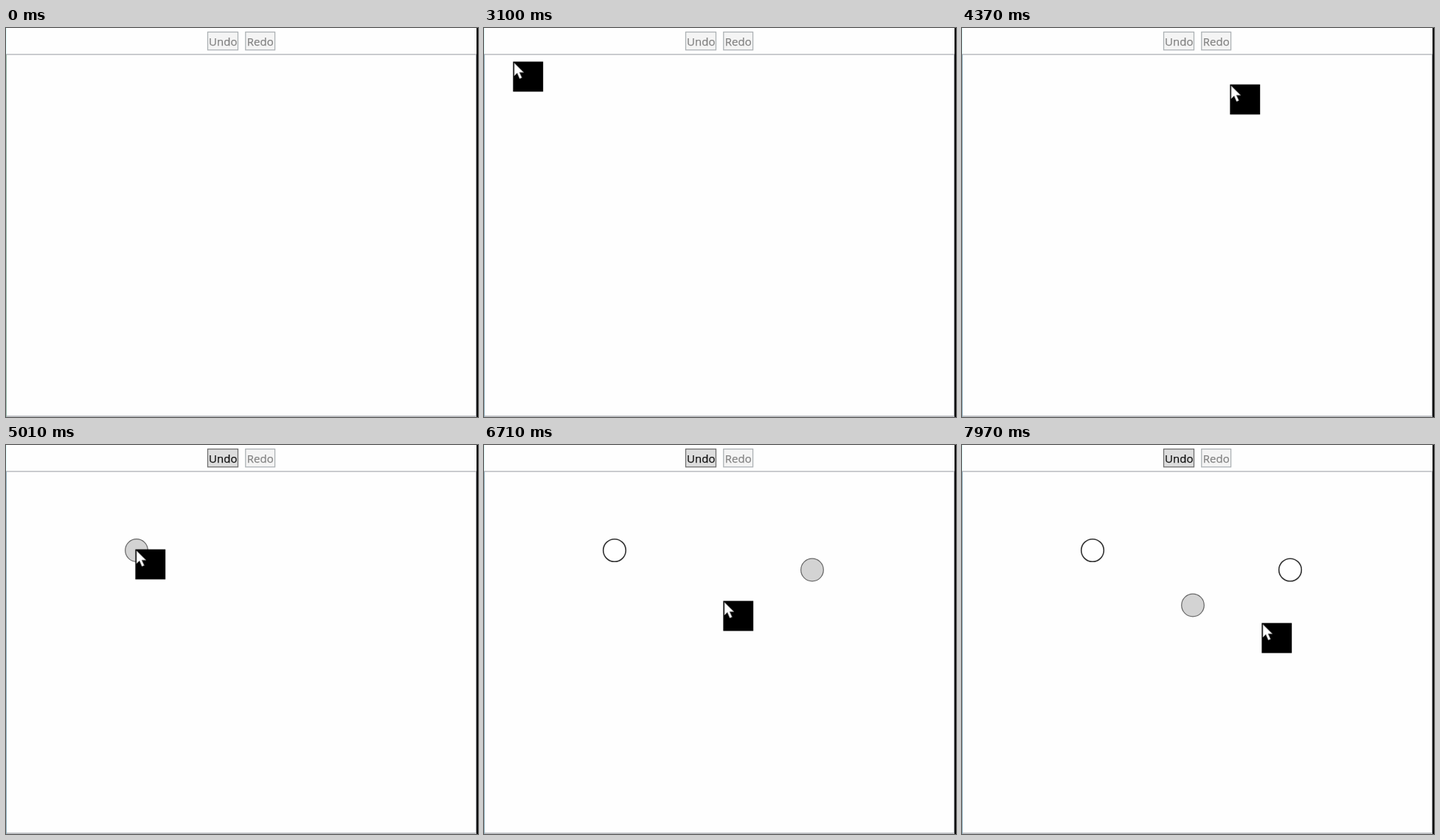
Recreate the animation shown at these times as an HTML page. Size 640 px wide and 528 px high, loop 8 s.

```html
<!DOCTYPE html>
<html lang="en">
<head>
<meta charset="utf-8">
<title>Circle drawer</title>
<style>
  html, body { margin: 0; width: 640px; height: 528px; overflow: hidden; background: #fefefe; }
  svg { display: block; }
  text { font: 15px "Open Sans", sans-serif; text-anchor: middle; fill: #838383; stroke: #838383; stroke-width: .25; }
  .button rect { fill: #f4f4f4; stroke: #adb2b5; stroke-width: 1.3; }
  .button.enabled rect { fill: #ddd; stroke: #707070; }
  .button.enabled text { fill: #111; stroke: #111; }
  circle { fill: #fff; stroke: #333; stroke-width: 1.6; }
  circle.selected { fill: #d3d3d3; stroke: #666; stroke-width: 1.2; }
</style>
</head>
<body>
<svg width="640" height="528" viewBox="0 0 640 528">
  <path d="M.5 0V35" stroke="#e2fbfb"/>
  <path d="M0 35.8H637.5V527H0" fill="none" stroke="#abadb3" stroke-width="1.3"/>
  <path d="M.5 36V528" id="leftEdge"/>
  <path d="M639 0V528" stroke="#000" stroke-width="2"/>
  <g class="button" id="undo">
    <rect x="273.5" y="5.5" width="41" height="24.3"/><text x="294.3" y="23.7">Undo</text>
  </g>
  <g class="button">
    <rect x="324.8" y="5.5" width="39.8" height="24.3"/><text x="344.8" y="23.7">Redo</text>
  </g>
  <g id="circles"></g>
  <g id="pointer">
    <rect x="-.6" y="-.4" width="40.8" height="40.8"/>
    <path d="M1 1.5V19L5 15.2L8.3 22.8L11.4 21.4L8.1 14.2H13.8Z" fill="#fff" stroke="#777" stroke-width=".7"/>
  </g>
</svg>
<script>
const LOOP = 8000, TICKS_PER_MS = 0.03, ENTER = 93, RECOLOUR = 13;
const $ = id => document.getElementById(id);

const linear = u => u;
const easeIn = u => u ** 1.65;
const easeOut = u => 1 - (1 - u) ** 4;

// Each move starts where the previous one ended; the pointer rests in between
const start = { x: 40, y: 46 };
const moves = [
  { from: ENTER, to: 97, x: 121, y: 62, ease: linear },
  { from: 102, to: 107, x: 211, y: 121, ease: easeIn },
  { from: 123, to: 128, x: 440, y: 3, ease: linear },
  { from: 128, to: 131, x: 364, y: 77, ease: linear },
  { from: 131, to: 134, x: 176, y: 142, ease: linear },
  { from: 168, to: 170, x: 182, y: 146, ease: linear },
  { from: 176, to: 179, x: 262, y: 150, ease: linear },
  { from: 179, to: 186, x: 445, y: 169, ease: linear },
  { from: 197, to: 206, x: 312, y: 217, ease: easeOut },
  { from: 234, to: 239, x: 407, y: 242, ease: linear }
];
const clicks = [
  { at: 149, x: 177, y: 143 },
  { at: 189, x: 445, y: 169.5 },
  { at: 214, x: 313, y: 217.5 }
];

function pointerAt(tick) {
  let { x, y } = start;
  for (const move of moves) {
    const u = Math.min(1, Math.max(0, (tick - move.from) / (move.to - move.from)));
    x += (move.x - x) * move.ease(u);
    y += (move.y - y) * move.ease(u);
  }
  return [Math.round(x), Math.round(y)];
}

function draw() {
  // The screen is sampled 30 times a second
  const tick = Math.floor(performance.now() % LOOP * TICKS_PER_MS);
  const drawn = clicks.filter(click => tick >= click.at);
  $("circles").innerHTML = drawn.map(({ x, y }, i) =>
    `<circle cx="${x}" cy="${y}" r="15.3" class="${i === drawn.length - 1 ? "selected" : ""}"/>`).join("");
  $("undo").classList.toggle("enabled", drawn.length > 0);
  $("leftEdge").setAttribute("stroke", tick < RECOLOUR ? "#93b5a8" : "#8fb0bd");
  $("pointer").style.display = tick < ENTER ? "none" : "";
  $("pointer").setAttribute("transform", `translate(${pointerAt(tick)})`);
  requestAnimationFrame(draw);
}
draw();
</script>
</body>
</html>
```
